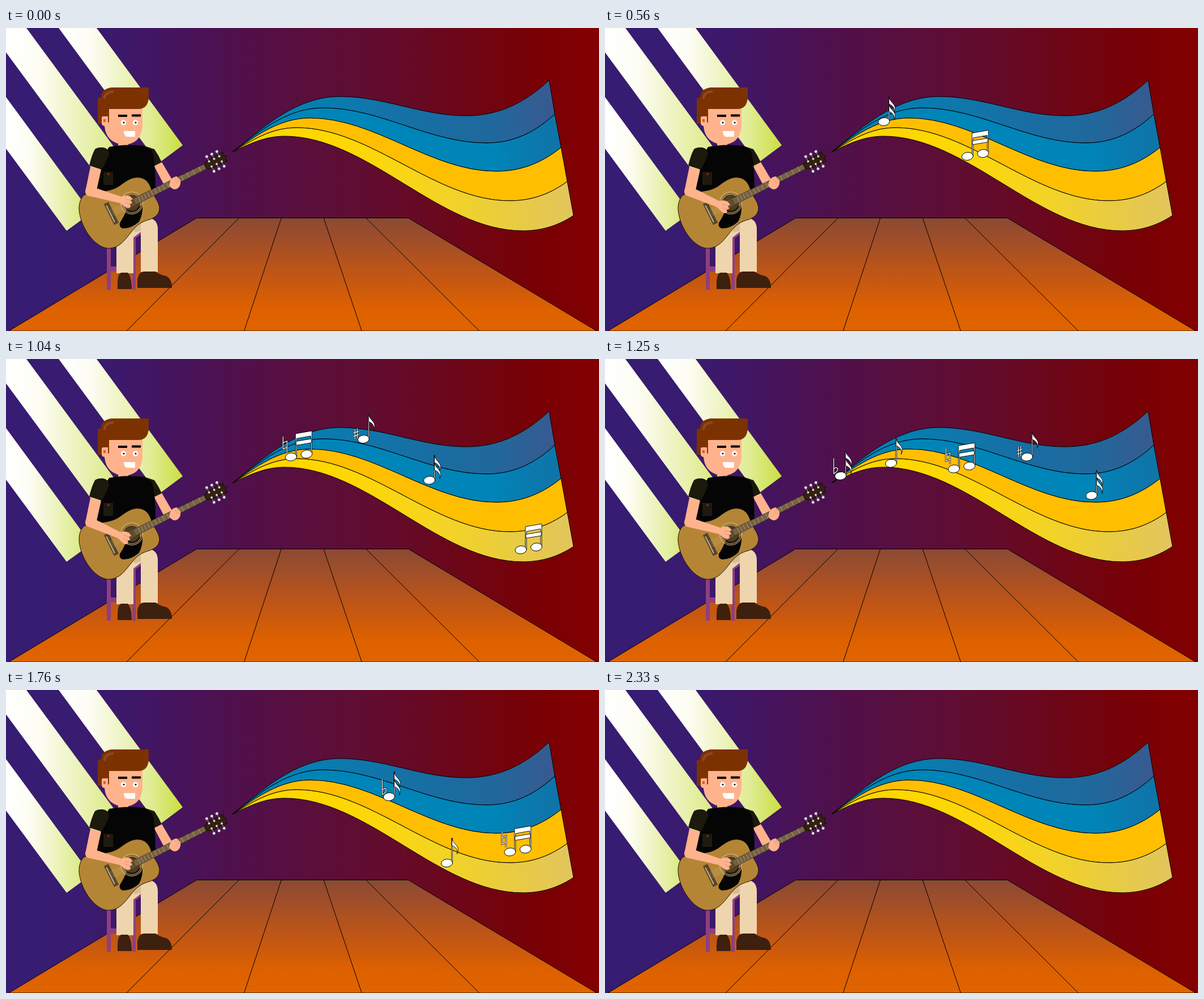
Recreate the animation shown at these times as an HTML page with a canvas. Size 1047 by 535 pixels, loop 2360 ms.

```html
<!DOCTYPE html>
<html lang="en">
<head>
<meta charset="utf-8">
<title>Guitar stage</title>
<style>
html, body { margin: 0; width: 100%; height: 100%; overflow: hidden; background: #361c72; }
canvas { display: block; width: 1047px; height: 535px; }
</style>
</head>
<body>
<canvas id="stage" width="1047" height="535"></canvas>
<script>
const W = 1047, H = 535, LOOP = 2360;
const view = document.getElementById('stage').getContext('2d');
const skin = '#ffb38c';
let g;

function gradient(x0, y0, x1, y1, colors) {
  const grad = g.createLinearGradient(x0, y0, x1, y1);
  colors.forEach((c, i) => grad.addColorStop(i / (colors.length - 1), c));
  return grad;
}

function paint(path, fill, line, width = 1) {
  const p = typeof path === 'string' ? new Path2D(path) : path;
  if (fill) { g.fillStyle = fill; g.fill(p); }
  if (line) { g.strokeStyle = line; g.lineWidth = width; g.stroke(p); }
}

function box(x, y, w, h, fill) {
  g.fillStyle = fill;
  g.fillRect(x, y, w, h);
}

function oval(x, y, rx, ry, fill, line, width = 1, turn = 0) {
  const p = new Path2D();
  p.ellipse(x, y, rx, ry, turn, 0, Math.PI * 2);
  paint(p, fill, line, width);
}

function backdrop() {
  box(0, 0, W, H, gradient(0, 0, W, 0, ['#361c72', '#371c72', '#3d186a', '#47135a', '#51104a',
    '#590f3d', '#600d32', '#670923', '#700512', '#790004', '#830000']));
  const glow = (a, b) => gradient(a, 0, b, 0, ['#fff', '#fdfdf4', '#eff4c4', '#dfec92', '#cade3f']);
  paint('M0 122L133 303L140 334L107 358L0 213Z', glow(0, 165));
  paint('M0 0H36L210 236L188 298L0 43Z', glow(0, 235));
  paint('M93 0H160L312 207L269 239Z', glow(93, 312));
}

function floor() {
  paint('M336.5 335.5H710.5L1043 535H5Z', gradient(0, 335, 0, 535,
    ['#8a4a33', '#a04e29', '#b6531c', '#ca590e', '#de6100', '#e06400']), '#000');
  for (let i = 1; i < 5; i++) {
    paint(`M${336.5 + i * 74.8} 335.5L${5 + i * 207.7} 535`, null, '#000');
  }
}

// Each edge: crest, trough, end.
const edges = [
  [590, 121, 812, 155, 959, 92],
  [560, 141, 848, 203, 969, 152],
  [537, 159, 865, 253, 980, 211],
  [513, 176, 889, 305, 991, 271],
  [492, 191, 912, 358, 1002, 331]
];

function edge([px, py, qx, qy, ex, ey], back) {
  const ax = 400, ay = 219, d = px - ax, m = (qx - px) * .35, r = ex - qx;
  const pts = [[ax, ay], [ax + d * .3, ay + (py - ay) * .47], [px - d * .4, py], [px, py],
    [px + m, py], [qx - m, qy], [qx, qy],
    [qx + r * .32, qy], [ex - r * .35, ey - (ey - qy) * .77], [ex, ey]];
  if (back) pts.reverse();
  return pts[0] + 'C' + pts.slice(1).join(' ');
}

function ribbon() {
  const fills = [
    gradient(440, 0, 965, 0, ['#0085b8', '#087db1', '#1175a9', '#186da2', '#20689c', '#385a90']),
    gradient(860, 0, 985, 0, ['#0085b8', '#0a7aae', '#1173a6']),
    '#ffbf00',
    gradient(560, 0, 1000, 0, ['#ffd700', '#fbd60e', '#f3d326', '#e9cc40', '#e2c55c'])
  ];
  fills.forEach((f, i) => {
    paint('M' + edge(edges[i]) + 'L' + edge(edges[i + 1], true) + 'Z', f, '#000');
  });
}

function legs() {
  const wood = '#8f3f80';
  box(178, 380, 7, 82, wood);
  box(223, 357, 6, 105, wood);
  box(184, 421, 14, 9, wood);
  paint('M224 357H239V364L229 371H224Z', wood);
  const cloth = '#eed5ad';
  paint('M195 345H238V360L225 370V433H195Z', cloth);
  paint('M224 352Q228 335 252 335Q268 338 268 355V431H238V358Z', cloth);
  paint('M225 352L238 344V358L226 361Z', '#d8bd94');
  paint('M197 461Q196 432 204 432H215Q222 440 222 461Z', '#3d200e');
  paint('M232 459V444Q234 431 243 430H264Q272 436 283 438Q293 443 293 459Z', '#3d200e');
}

function torso() {
  paint('M198 193H216V209H198Z', skin);
  paint('M259 239L274 235L294 269L289 281L278 275Z', skin);
  paint('M244 208L262 214Q269 224 275 237L263 243L248 236Z', '#1c190d');
  paint('M182 210Q210 204 243 208L257 216Q264 230 264 290L230 300L160 286Q166 250 171 228Z', '#050505');
  paint('M172 211Q181 212 182 223Q176 239 169 250L147 243Q151 225 157 214Q163 210 172 211Z', '#1c190d');
  box(172, 254, 17, 23, '#1f1a10');
  oval(181, 258, 1.6, 1.6, '#c42b1c');
}

function head() {
  paint('M174 128H241V174Q238 205 208 206Q177 203 174 174Z', skin);
  paint('M162 124L182 120V166L177 169V157H170V169H162Z', '#7c3200');
  paint('M169 158Q169 156 172 156H180V173H173Q169 172 169 168Z', skin);
  box(172, 161, 4, 5, '#e2553a');
  paint('M168 126Q166 108 186 105H252V124Q250 143 234 143H179Q167 140 168 126Z', '#7c3200');
  paint('M174 125Q174 113 190 112', null, '#8f4925', 4);
  box(198, 153, 16, 4, '#000');
  box(222, 152.5, 16, 4, '#000');
  for (const x of [207.5, 228.5]) {
    oval(x, 167, 4.7, 4.7, '#fff');
    oval(x + .5, 167, 1.6, 1.6, '#111');
  }
  paint('M208 182H228V192H213Q208 190 208 182Z', '#fff');
}

function guitar() {
  paint('M129 319C129 307 133 299 138 295C153 286 179 293 200 279C211 271 222 262 236 264' +
    'C249 266 254 276 257 286C260 297 269 304 271 317C271 329 264 334 254 338' +
    'C239 342 232 347 223 358C210 374 201 389 180 389C155 387 130 349 129 319Z', '#b58536', '#1a1205');
  paint('M241 313Q242 329 235 342Q222 354 207 354Q199 352 201 344Q209 332 213 320Z', '#050505');
  g.save();
  g.translate(222, 309);
  g.rotate(-.461);
  oval(0, 0, 19.5, 19.5, null, '#cfb585', 1);
  oval(0, 0, 17, 17, null, '#857046', 2);
  oval(0, 0, 14, 14, '#523d20', '#30230f');
  box(-45, -20, 9, 41, '#57452b');
  box(-43, -16, 2, 33, '#c6b48c');
  paint('M5 -6L148 -4.5V4.5L5 6Z', '#665136', '#2d2110', .7);
  for (let i = 0; i < 16; i++) {
    const x = 147 - 228 * (1 - 2 ** (-i / 12));
    paint(`M${x} -5V5`, null, '#b3a078', .8);
  }
  for (let i = 0; i < 6; i++) {
    const y = (i - 2.5) * 1.5;
    paint(`M-40 ${y * 1.5}L148 ${y}`, null, 'rgba(205,190,150,.6)', .45);
  }
  paint('M145 -4L152 -8L184 -9Q181 -3 187 0Q181 4 184 9L152 8L145 4Z', '#35200e', '#130b04');
  for (let i = 0; i < 3; i++) for (const s of [-1, 1]) {
    const x = 155 + i * 10;
    paint(`M${x} ${s * 5}V${s * 14}`, null, '#99989b', 1);
    oval(x, s * 5, 2, 2, '#e2e2e2', '#555', .6);
    oval(x, s * 14.5, 2.6, 2.5, '#ececf2', '#55525a', .7);
  }
  g.restore();
  paint('M290 270Q293 264 298 263Q302 260 304 265Q309 267 308 275Q306 284 298 285Q292 284 288 278Z', skin);
  paint('M298 265L303 275M302 264L306 273', null, '#d98e6b', .7);
  paint('M149 245L168 250L160 286L143 295Q138 291 141 284Z', skin);
}

function forearm(turn) {
  g.save();
  g.translate(148, 288);
  g.rotate(turn);
  g.translate(-148, -288);
  paint('M141 284L160 283L204 298Q211 294 219 297L224 302L220 304L223 309L219 311L220 316' +
    'Q215 320 209 315L201 309L144 296Q139 292 141 284Z', skin);
  paint('M210 303L220 304M211 308L219 311', null, '#d98e6b', .8);
  g.restore();
}

function still(draw) {
  const c = document.createElement('canvas');
  c.width = W;
  c.height = H;
  g = c.getContext('2d');
  draw();
  return c;
}
const scene = still(() => {
  [backdrop, floor, ribbon, legs, torso, head, guitar].forEach(part => part());
});

// Note parts, measured from the centre of the left head.
const noteHead = x => oval(x, x ? -5 : 0, 10, 7, '#fff', '#000', 1, -.12);
const flag = y => paint(`M9 ${y}C11 ${y + 12} 25 ${y + 13} 18 ${y + 28}C20 ${y + 20} 15 ${y + 15} 9 ${y + 13}Z`, '#fff', '#000', .9);

function single(flags) {
  paint('M8.2 0V-44H10V0Z', '#fff', '#000', .8);
  for (let i = 0; i < flags; i++) flag(-44 + i * 13);
  noteHead(0);
}

function pair() {
  paint('M8 0V-41L37 -46V-5H35V-37L10 -32.5V0Z', '#fff', '#000', .9);
  paint('M9 -27.5L36 -32V-25L9 -20.5Z', '#fff', '#000', .9);
  noteHead(0);
  noteHead(27.5);
}

function mark(path) {
  paint(path, null, '#000', 2.8);
  paint(path, null, '#fff', 1.3);
}
const signs = {
  sharp: 'M-15 -18V0M-11 -19V-1M-18 -11L-8 -14M-18 -5L-8 -8',
  natural: 'M-14 -36V-14L-7 -17M-7 -8V-28L-14 -25',
  flat: 'M-12 -31V-4Q-4 -8 -5 -13Q-8 -17 -12 -12'
};

// Lanes along the ribbon, as x, y pairs.
const lanes = [
  [400, 219, 450, 180, 501, 150, 570, 135, 620, 139, 745, 173, 830, 188, 913, 170, 965, 144],
  [400, 219, 450, 182, 540, 153, 569, 156, 620, 169, 799, 231, 859, 241, 922, 233, 960, 206],
  [400, 219, 450, 190, 525, 171, 616, 194, 700, 230, 777, 263, 877, 287, 965, 262],
  [400, 219, 440, 198, 495, 184, 560, 196, 664, 238, 775, 304, 850, 329, 909, 337, 922, 350, 942, 430]
];

function laneY(p, x) {
  const last = p.length / 2 - 1;
  const X = i => p[2 * i], Y = i => p[2 * i + 1];
  let i = 0;
  while (i < last - 1 && x > X(i + 1)) i++;
  const slope = k => {
    const a = Math.max(k - 1, 0), b = Math.min(k + 1, last);
    return (Y(b) - Y(a)) / (X(b) - X(a));
  };
  const w = X(i + 1) - X(i), u = (x - X(i)) / w, v = 1 - u;
  return v * v * (1 + 2 * u) * Y(i) + u * u * (3 - 2 * u) * Y(i + 1) +
    u * v * w * (v * slope(i) - u * slope(i + 1));
}

// lane, end time, sign, shape, then time and x pairs
const notes = [
  { lane: 3, end: 1150, shape: pair, keys: [138, 400, 290, 488, 800, 775, 1040, 909, 1130, 940] },
  { lane: 1, end: 1425, shape: () => single(2), keys: [386, 400, 800, 620, 1250, 859, 1430, 955] },
  { lane: 0, end: 1625, sign: 'sharp', shape: () => single(1), keys: [614, 400, 800, 501, 1250, 745, 1550, 913, 1640, 961] },
  { lane: 2, end: 1900, sign: 'natural', shape: pair, keys: [848, 400, 1250, 616, 1550, 777, 1900, 965] },
  { lane: 3, end: 2110, shape: () => single(1), keys: [1052, 400, 1250, 505, 1550, 664, 2000, 909, 2090, 940] },
  { lane: 1, end: 2325, sign: 'flat', shape: () => single(2), keys: [1219, 400, 1550, 569, 2000, 799, 2300, 952, 2330, 960] }
];

function keyed(k, t) {
  let i = 0;
  while (i < k.length - 4 && t > k[i + 2]) i += 2;
  return k[i + 1] + (k[i + 3] - k[i + 1]) * (t - k[i]) / (k[i + 2] - k[i]);
}

// The first two poses are held longer than the rest.
function beat(t) {
  if (t < 100) return 0;
  if (t < 200) return 170;
  return 20 + 30 * Math.floor((t - 20) / 30);
}

function strum(t) {
  const d = Math.min(...[500, 800, 1100, 1400].map(c => Math.abs(t - c)));
  return d < 120 ? (1 + Math.cos(Math.PI * d / 120)) / 2 : 0;
}

function frame(now) {
  const t = beat(now % LOOP);
  g = view;
  g.drawImage(scene, 0, 0);
  forearm(strum(t) * .28);
  for (const n of notes) {
    if (t < n.keys[0] || t > n.end) continue;
    const x = keyed(n.keys, t);
    g.save();
    g.translate(x, laneY(lanes[n.lane], x));
    if (n.sign) mark(new Path2D(signs[n.sign]));
    n.shape();
    g.restore();
  }
}

let start;
function tick(now) {
  start ??= now;
  frame(now - start);
  requestAnimationFrame(tick);
}
frame(0);
requestAnimationFrame(tick);
</script>
</body>
</html>
```
